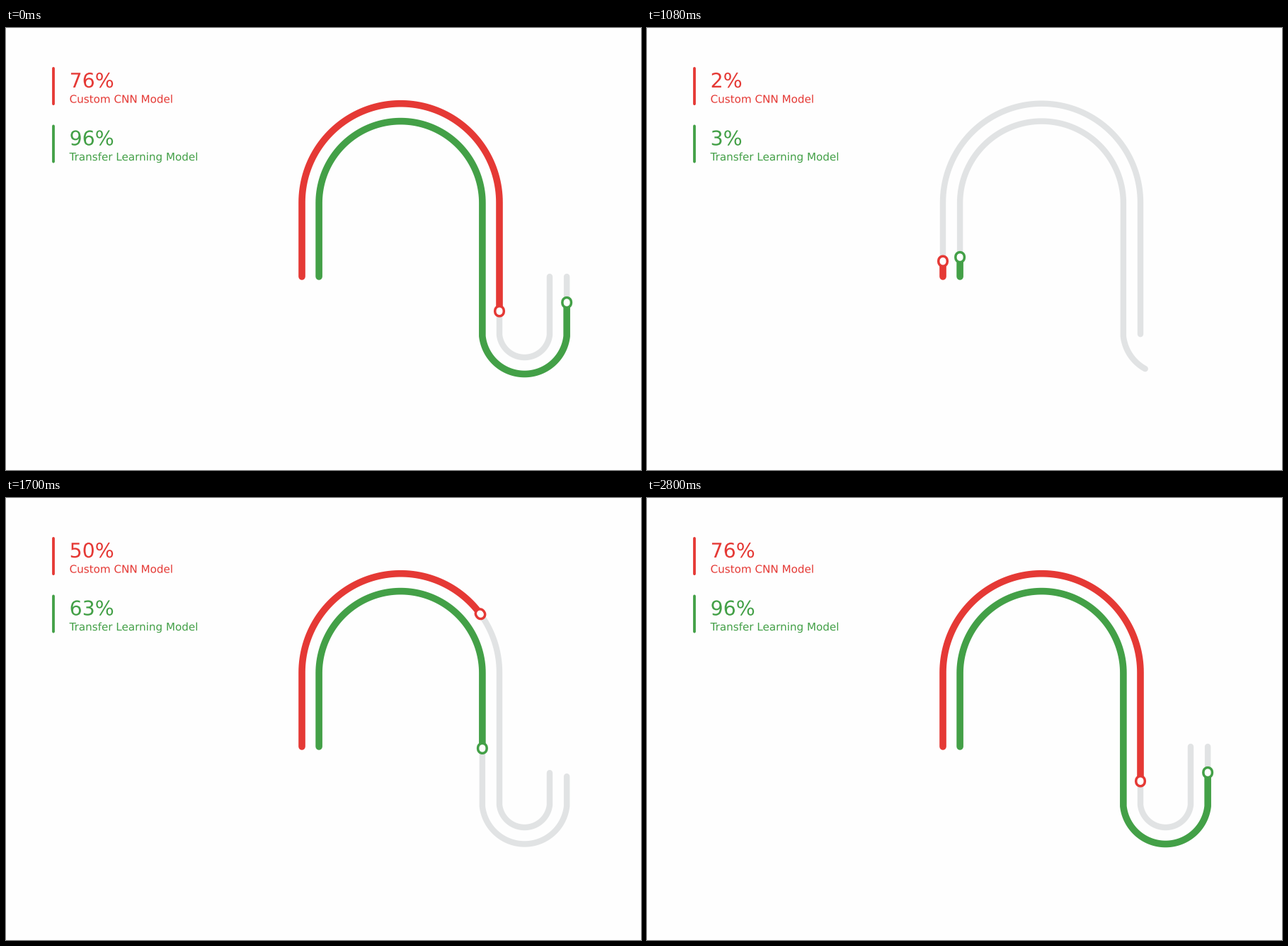
Animation, 897 px wide and 624 px high, one loop 6.9 s. Source, as a matplotlib script:

```python
import numpy as np
import matplotlib.pyplot as plt
from matplotlib.animation import FuncAnimation
from matplotlib.patches import PathPatch
from matplotlib.path import Path
from matplotlib.textpath import TextPath

W, H, DPI = 897, 624, 128
STEP, LOOP = 20, 6900
RED, GREEN, GREY, PAPER = "#e53935", "#43a047", "#e1e3e4", "#fefefe"

plt.rcParams["path.simplify"] = False
plt.rcParams["font.family"] = "DejaVu Sans"
fig = plt.figure(figsize=(W / DPI, H / DPI), dpi=DPI, facecolor=PAPER)
ax = fig.add_axes([0, 0, 1, 1])
ax.set_xlim(0, W)
ax.set_ylim(H, 0)
ax.axis("off")


def stroke(color, width, z):
    line, = ax.plot([], [], color=color, lw=width * 72 / DPI, zorder=z,
                    solid_capstyle="round", solid_joinstyle="miter")
    line.set_snap(False)
    return line


def text_path(s, size, x, y):
    p = TextPath((0, 0), s, size=size)
    return Path(p.vertices * [1, -1] + [x, y], p.codes)


def arc(cx, cy, r, a, b):
    t = np.radians(np.linspace(a, b, 90))
    return np.column_stack([cx + r * np.cos(t), cy + r * np.sin(t)])


def cubic_out(s):
    return 1 - (1 - s) ** 3


def quint_in_out(s):
    return 16 * s ** 5 if s < 0.5 else 1 - 16 * (1 - s) ** 5


def phase(t, start, length):
    return min(max((t - start) / length, 0), 1)


class Track:
    """One S-shaped gauge with its legend entry."""

    def __init__(self, color, goal, label, big, small, dip, top, delay):
        self.goal, self.top, self.delay = goal, top, delay
        big_y, big_r = big
        small_y, small_r = small
        a = np.degrees(np.arcsin(dip / small_r))
        pts = np.vstack([[[557.5 - big_r, 351]],
                         arc(557.5, big_y, big_r, 180, 360),
                         arc(732.5, small_y, small_r, 180 - a, a),
                         [[732.5 + small_r * np.cos(np.radians(a)), 351]]])
        self.pts = pts
        self.dist = np.r_[0, np.cumsum(np.hypot(*np.diff(pts, axis=0).T))]
        self.total = self.dist[-1]

        self.rail = stroke(GREY, 8.4, 1)
        self.fill = stroke(color, 9.6, 2)
        self.ring = stroke(color, 16, 3)
        self.hole = stroke(PAPER, 9, 4)
        self.bar = stroke(color, 3.8, 1)
        self.bar.set_data([67, 67], [top + 1.9, top + 52.2])
        self.label = self.add_text(label, 15.15, top + 50.6, color)
        self.number = self.add_text("0%", 28.4, top + 29, color)

    def add_text(self, s, size, y, color):
        patch = PathPatch(text_path(s, size, 89.6, y), fc=color, lw=0)
        patch.set_snap(False)
        return ax.add_patch(patch)

    def cut(self, a, b):
        d = self.dist
        k = np.r_[a, d[(d > a) & (d < b)], b]
        return np.interp(k, d, self.pts[:, 0]), np.interp(k, d, self.pts[:, 1])

    def draw(self, t):
        drawn = cubic_out(phase(t, self.delay, 2520))
        value = self.goal * quint_in_out(phase(t, 362, 2500))
        fade = phase(t, 450, 300)

        self.rail.set_data(*self.cut(0, drawn * self.total))
        pos = value * self.total
        self.fill.set_data(*self.cut(0, pos))
        mid = max(pos, 0.8)
        for part in (self.ring, self.hole):
            part.set_data(*self.cut(mid - 0.8, mid + 0.8))

        self.number.set_path(
            text_path(f"{round(value * 100)}%", 28.4, 89.6, self.top + 29))
        for part in (self.bar, self.label, self.number):
            part.set_alpha(fade)


tracks = [
    Track(RED, 0.76, "Custom CNN Model",
          (246.2, 139.5), (429.3, 35.7), 4, 55, 45),
    Track(GREEN, 0.96, "Transfer Learning Model",
          (247, 115.4), (428.5, 60), 6.5, 136.5, 83),
]


def update(i):
    t = i * STEP
    # the finished chart is held briefly before the restart
    if t < 60:
        t = LOOP
    for track in tracks:
        track.draw(t)
    return []


anim = FuncAnimation(fig, update, frames=LOOP // STEP, interval=STEP,
                     init_func=lambda: update(0), repeat=True, repeat_delay=0)
plt.show()
```
